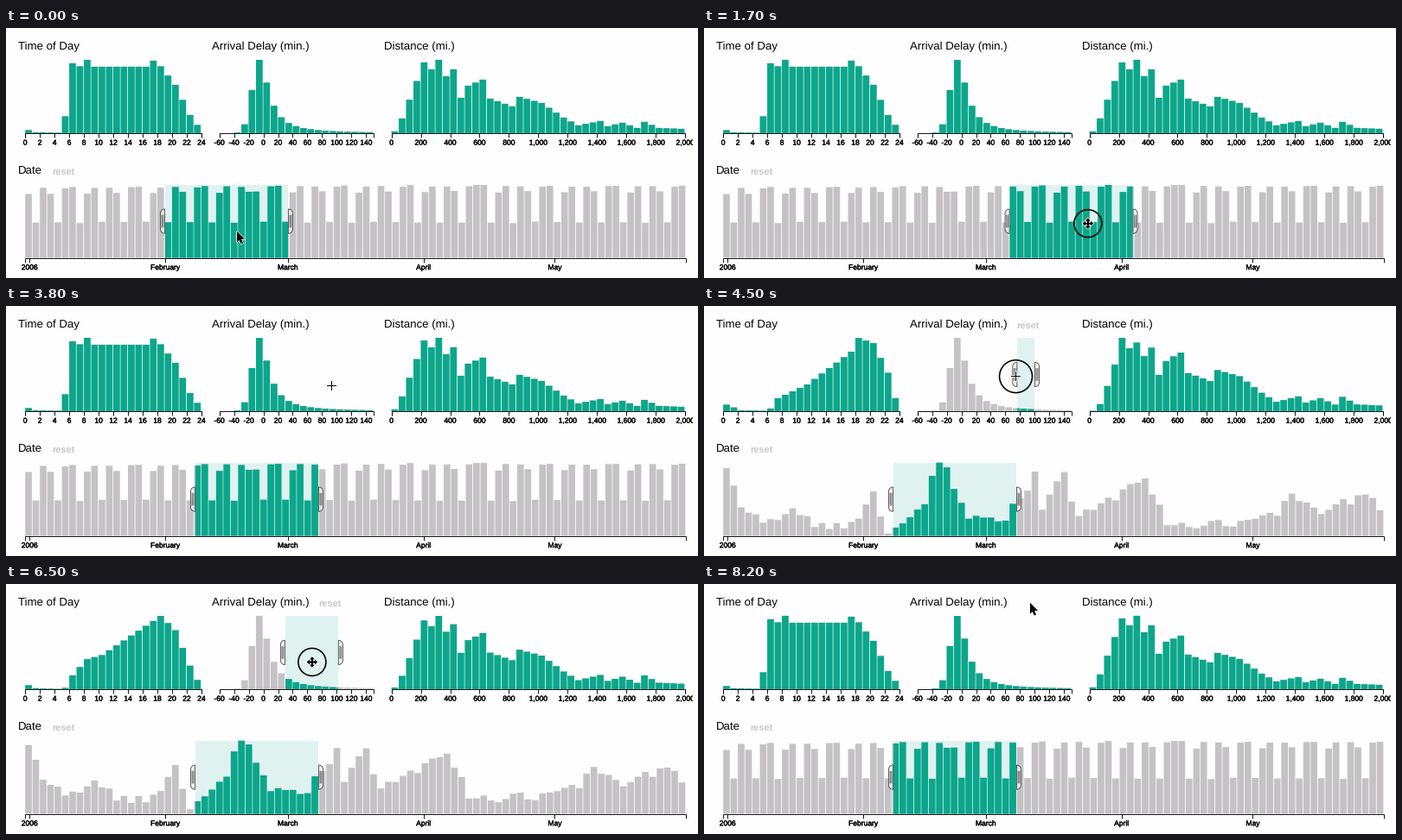
Recreate the animation shown at these times as a matplotlib script. Size 800 px wide and 290 px high, loop 8300 ms.

```python
import numpy as np
import matplotlib
import matplotlib.pyplot as plt
from matplotlib.animation import FuncAnimation
from matplotlib.collections import PolyCollection
from matplotlib.patches import Circle, PathPatch, Polygon, Rectangle
from matplotlib.path import Path
from matplotlib.patheffects import withStroke

matplotlib.rcParams["font.family"] = "Liberation Sans"
matplotlib.rcParams["text.hinting"] = "none"

W, H, FRAMES, STEP = 800, 290, 83, 100
S = 0.8489                  # layout unit in pixels
PITCH, BAR, FULL = 10 * S, 9 * S, 100 * S
PT = 0.72                   # points per pixel
BACK, TEAL, GRAY, RESET = "#fefdff", "#09a78b", "#c4c2c4", "#c9c8c9"


def curve(count, *keys):
    """Heights of `count` bars along straight lines through (index, height) keys."""
    return np.interp(np.arange(count), *zip(*keys))


def flights_by_delay():
    d = np.arange(21) - 5
    rise = np.exp(-.53 * d ** 2)
    tail = 1 / (1 + .45 * np.abs(d) ** 1.9)
    return FULL * np.where(d < 0, rise, tail)


def weekly():
    """Weekday bars with a weekend dip every third bar, rarely every fourth."""
    rng = np.random.default_rng(4)
    dips = {*range(1, 29, 3), *range(32, 60, 3), *range(63, 90, 3)}
    cycle = [(83, 77), (83, 84), (76, 83)]
    out, week, day = [], -1, 0
    for i in range(90):
        if i in dips:
            out.append(41 + rng.uniform(-1, 1))
            week, day = week + 1, 0
        else:
            drop = 2.5 * max(0, 1 - i / 36)
            out.append(cycle[week % 3][min(day, 1)] - drop + rng.uniform(-.6, .6))
            day += 1
    return np.array(out)


def late_days():
    """Uneven days: a trend through the worst ones plus seeded noise."""
    trend = curve(90, (0, 74), (2, 34), (4, 23), (9, 32), (16, 9), (18, 25), (20, 50),
                  (22, 7), (27, 43), (29, 85), (33, 30), (38, 22), (42, 67), (43, 35),
                  (46, 72), (48, 29), (57, 60), (60, 16), (75, 27), (77, 55), (81, 27),
                  (86, 52), (89, 40))
    noise = np.random.default_rng(12).normal(0, 4, 90)
    return np.clip(trend + noise, 5, FULL)


# each set: no delay filter, any late flight, very late flights only
TIME = [curve(24, (0, 3.5), (1, 1), (4, .5), (5, 19.5), (6, 81), (7, 77.5), (8, 85),
              (9, 77), (15, 77), (16, 77), (17, 84), (18, 77.5), (20, 56), (22, 21),
              (23, 9.5)),
        curve(24, (0, 4.5), (1, 1), (4, .3), (5, 1.5), (6, 16.5), (8, 35.5), (10, 40),
              (16, 74), (18, 85), (20, 68), (22, 26.5), (23, 10.5)),
        curve(24, (0, 7.5), (2, 1), (5, .5), (6, 3), (7, 15), (11, 31), (17, 69),
              (18, 85), (20, 79), (22, 44.5), (23, 15))]

distance = curve(40, (0, 2), (1, 17), (4, 82), (5, 74), (6, 85), (7, 66), (8, 74), (9, 41),
                 (10, 55), (12, 62), (13, 40), (16, 31), (17, 42), (20, 35), (23, 18),
                 (25, 9), (28, 14), (29, 8), (31, 12), (33, 6), (34, 13), (36, 6), (39, 5))
DIST = [distance,
        distance * curve(40, (0, .9), (6, 1), (39, 1.25)),
        distance * curve(40, (0, .2), (2, .75), (4, 1.03), (6, .93), (11, 1.08), (39, 1.3))]

late = late_days()
DAYS = [weekly(), late, FULL * (late / FULL) ** 1.25]
DELAY = flights_by_delay()

# pointer stops: time, x, y
STOPS = np.array([
    (0, 267, 236), (700, 267, 236), (1900, 458, 226), (2850, 283, 223), (3000, 302, 224),
    (3300, 302, 224), (3900, 382, 82), (4300, 382, 82), (4800, 321, 81), (5000, 351, 87),
    (5100, 351, 87), (5900, 296.5, 88), (6700, 364.5, 91), (7000, 377, 22),
    (8300, 377, 22)])
PRESSES = [(500, 3100), (4300, 4800), (5100, 6700), (7100, 7400)]
CLEARED = 7400


def pointer(t):
    k = min(np.searchsorted(STOPS[:, 0], t, side="right") - 1, len(STOPS) - 2)
    a, b = STOPS[k], STOPS[k + 1]
    u = (t - a[0]) / (b[0] - a[0])
    return a[1:] + (b[1:] - a[1:]) * u * u * (3 - 2 * u)


def days_range(t):
    lo = pointer(min(max(t - 50, 0), 3100))[0] - 83
    return lo, lo + 142


def delay_range(t):
    if t <= 4300 or t >= CLEARED:
        return None
    if t <= 5100:
        return pointer(min(t - 10, 4800))[0], 382
    lo = pointer(min(t - 10, 6700))[0] - 30
    return lo, lo + 61


def blend(sets, brush):
    if brush is None:
        return sets[0]
    minutes = (brush[0] - 246.6) / S - 60
    out = np.array([np.interp(minutes, (-8, 28, 76), col) for col in zip(*sets)])
    return out * FULL / out.max()


def ring_state(t):
    """Radius and opacity of the click ring, or None."""
    for down, up in PRESSES:
        if down <= t < up:
            u = min((t - down) / 300, 1)
            return 16 + 11 * (1 - u) ** 1.2, 1
        if up <= t < up + 400:
            u = min((t - up) / 200, 1)
            return 16 + 11 * u, 1 - .75 * u
    return None


ARROW = np.array([(0, 0), (0, 12.4), (2.8, 9.8), (4.8, 14.4), (6.8, 13.5), (4.9, 9),
                  (8.8, 9)])


def four_way(arm):
    pts = np.array(arm, float)
    parts = []
    for _ in range(4):
        parts.append(pts)
        pts = np.column_stack((-pts[:, 1], pts[:, 0]))
    return np.vstack(parts)


MOVE = four_way([(-.9, -.9), (-.9, -3.2), (-2.7, -3.2), (0, -6), (2.7, -3.2), (.9, -3.2)])
CROSS = four_way([(-.5, -.5), (-.5, -5.5), (.5, -5.5)])


def pointer_shape(t):
    if 300 <= t < 3400 or 4900 <= t < 6800:
        return MOVE
    if 3800 <= t < 4900:
        return CROSS
    return ARROW


fig = plt.figure(figsize=(W / 100, H / 100), dpi=100, facecolor=BACK)
ax = fig.add_axes([0, 0, 1, 1])
ax.set_xlim(0, W)
ax.set_ylim(H, 0)
ax.axis("off")


def label(x, y, s, px, color="black", **kw):
    return ax.text(x, y, s, fontsize=px * PT, color=color, va="baseline", **kw)


def handle_path(x, top, side):
    y, a = 100 / 3, np.linspace(0, np.pi / 2, 9)
    arc = np.column_stack((.5 + 6 * np.sin(a), y + 6 - 6 * np.cos(a)))
    low = arc[::-1] * (1, -1) + (0, 100)
    grips = [(2.5, y + 8), (2.5, 2 * y - 8), (4.5, y + 8), (4.5, 2 * y - 8)]
    verts = np.vstack((arc, low, arc[:1], grips)) * (side * S, S) + (x, top)
    codes = ([Path.MOVETO] + [Path.LINETO] * 17 + [Path.CLOSEPOLY]
             + [Path.MOVETO, Path.LINETO] * 2)
    return Path(verts, codes)


class Chart:
    def __init__(self, x, base, count, title, title_x, ticks):
        self.x, self.base, self.count = x, base, count
        self.back = self.bars(GRAY, 2)
        self.front = self.bars(TEAL, 4)
        self.extent = Rectangle((0, base - FULL), 0, FULL, fc=TEAL, alpha=.125, lw=0,
                                zorder=3)
        ax.add_patch(self.extent)
        self.handles = [PathPatch(handle_path(0, 0, s), fc=(.93, .93, .93, .8),
                                  ec="#505050", lw=.9 * PT, zorder=6) for s in (-1, 1)]
        for h in self.handles:
            ax.add_patch(h)
        label(title_x, base - 96.4, title, 13.25)
        self.reset = None
        self.axis(ticks)

    def bars(self, color, z):
        c = PolyCollection([], facecolors=color, linewidths=0, zorder=z)
        c.set_snap(False)
        ax.add_collection(c)
        return c

    def axis(self, ticks):
        end = self.x + self.count * PITCH
        pen = dict(color="black", lw=.9 * PT, zorder=5, solid_capstyle="butt")
        ax.plot([self.x, end], [self.base] * 2, **pen)
        for x in [self.x, end] + [x for x, _ in ticks]:
            ax.plot([x, x], [self.base, self.base + 6 * S], **pen)
        heavy = [withStroke(linewidth=.35 * PT, foreground="black")]
        for x, s in ticks:
            label(x, self.base + 13.7, s, 8.5, ha="center", path_effects=heavy)

    def add_reset(self, x):
        self.reset = label(x, self.base - 96.4, "reset", 11, RESET, weight="bold")

    def rects(self, heights, lo, hi):
        out = []
        for i, h in enumerate(heights):
            a = max(self.x + i * PITCH, lo)
            b = min(self.x + i * PITCH + BAR, hi)
            if b > a:
                y = self.base - h
                out.append([(a, self.base), (a, y), (b, y), (b, self.base)])
        return out

    def show(self, heights, brush=None):
        lo, hi = brush or (0, W)
        self.back.set_verts(self.rects(heights, 0, W))
        self.front.set_verts(self.rects(heights, lo, hi))
        on = brush is not None
        self.extent.set_visible(on)
        if self.reset:
            self.reset.set_visible(on)
        for h, x, side in zip(self.handles, (lo, hi), (-1, 1)):
            h.set_visible(on)
            h.set_path(handle_path(x, self.base - FULL, side))
        self.extent.set_x(lo)
        self.extent.set_width(hi - lo)


def number_ticks(x, start, stop, step, unit):
    return [(x + (v - start) / unit * PITCH, f"{v:,}") for v in range(start, stop + 1, step)]


TOP, LOW = 121.9, 266.6     # axis heights
months = zip((1, 32, 60, 91, 121), ("2006", "February", "March", "April", "May"))
time_chart = Chart(22.2, TOP, 24, "Time of Day", 13.7, number_ticks(22.2, 0, 24, 2, 1))
delay_chart = Chart(246.6, TOP, 21, "Arrival Delay (min.)", 238.2,
                    number_ticks(246.6, -60, 140, 20, 10))
dist_chart = Chart(445.6, TOP, 40, "Distance (mi.)", 437,
                   number_ticks(445.6, 0, 2000, 200, 50))
days_chart = Chart(22.2, LOW, 90, "Date", 13.7,
                   [(22.2 + d * 5.06, m) for d, m in months])
delay_chart.add_reset(361.5)
days_chart.add_reset(53.5)

# right margin cuts the last distance label
ax.add_patch(Rectangle((793.5, 0), 10, H, fc=BACK, lw=0, zorder=7))

ring = Circle((0, 0), 16, fill=False, ec="black", lw=1.6 * PT, zorder=9)
cursor = Polygon(ARROW, closed=True, fc="black", lw=0, zorder=10,
                 path_effects=[withStroke(linewidth=1.7 * PT, foreground="white")])
body = Polygon(ARROW, closed=True, fc="black", lw=0, zorder=11)
for patch in (ring, cursor, body):
    ax.add_patch(patch)


def draw(n):
    t = n * STEP
    brush = delay_range(t)
    time_chart.show(blend(TIME, brush))
    delay_chart.show(DELAY, brush)
    dist_chart.show(blend(DIST, brush))
    days_chart.show(blend(DAYS, brush), days_range(t))

    pos = pointer(t)
    for patch in (cursor, body):
        patch.set_xy(pointer_shape(t) + pos)
    state = ring_state(t)
    ring.set_visible(state is not None)
    if state:
        ring.set_center(pos)
        ring.set_radius(state[0])
        ring.set_alpha(state[1])
    return []


anim = FuncAnimation(fig, draw, frames=FRAMES, interval=STEP, repeat=True, repeat_delay=0,
                     init_func=lambda: draw(0))
plt.show()
```
